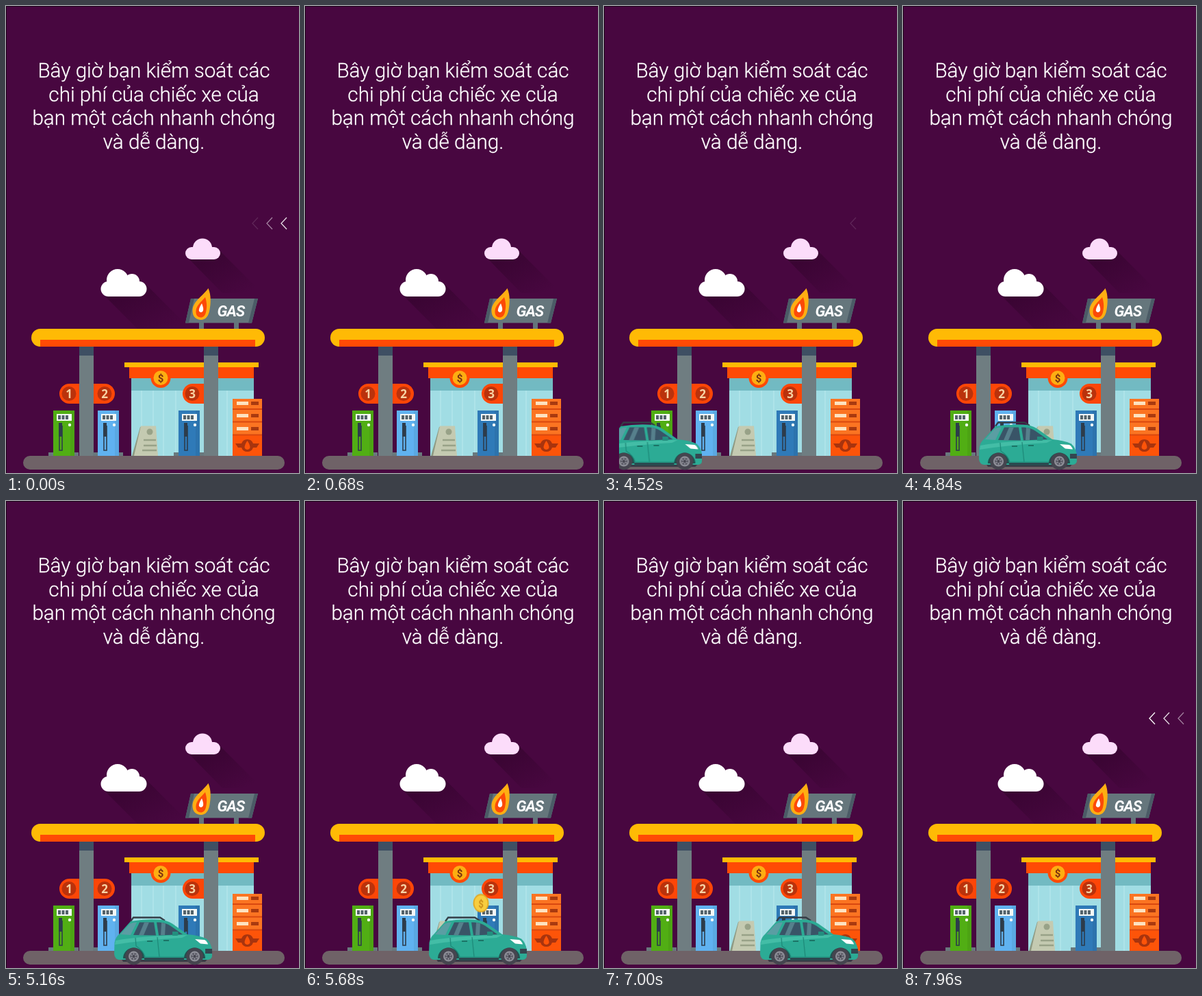
Animation, 428 px wide and 680 px high, one loop 8 s. Source, as an HTML page:

```html
<!DOCTYPE html>
<html lang="vi">
<head>
<meta charset="utf-8">
<title>Trạm xăng</title>
<style>
html, body { margin: 0; width: 100%; height: 100%; overflow: hidden; background: #480740; }
svg { display: block; width: 428px; height: 680px; }
.copy { font: 300 29.7px Roboto, sans-serif; fill: #fff; stroke: #fff; stroke-width: .3; text-anchor: middle; }
.gas { font: italic 700 22.5px Roboto, sans-serif; letter-spacing: -1.2px; fill: #fff; }
.num { font: 700 17px "Noto Sans", "Open Sans", sans-serif; fill: #f8d3a4; text-anchor: middle; }
.usd { font: 700 15px Roboto, sans-serif; text-anchor: middle; }
.chev { fill: none; stroke: #fff; stroke-width: 1.3; }

#c3, #c2, #c1, .drift, .dash, .toss { animation: 8s linear infinite; }
#c3 { animation-name: c3; }
#c2 { animation-name: c2; }
#c1 { animation-name: c1; }
@keyframes c3 {
  0% { opacity: .875 } .5%, 1.5% { opacity: 1 } 5.5%, 45% { opacity: 0 }
  49%, 50% { opacity: 1 } 54%, 92.5% { opacity: 0 } 96.5%, 97.5% { opacity: 1 } 100% { opacity: .375 }
}
@keyframes c2 {
  0% { opacity: .5 } 2%, 3% { opacity: 1 } 7%, 46.5% { opacity: 0 }
  50.5%, 51.5% { opacity: 1 } 55.5%, 94% { opacity: 0 } 98%, 99% { opacity: 1 } 100% { opacity: .75 }
}
@keyframes c1 {
  0% { opacity: .125 } 3.5%, 4.5% { opacity: 1 } 8.5%, 48% { opacity: 0 }
  52%, 53% { opacity: 1 } 57%, 95.5% { opacity: 0 } 99.5%, 100% { opacity: 1 }
}

/* slow drift plus a cubic dash in and out */
.drift { animation-name: drift; }
@keyframes drift {
  0%, 50% { transform: translateX(121.4px) }
  100% { transform: translateX(260.9px) }
}
.dash { animation-name: dash; }
@keyframes dash {
  0%, 50% { transform: translateX(-521px); animation-timing-function: cubic-bezier(.3333, 1, .6667, 1) }
  68.375% { transform: none }
  85.25% { transform: none; animation-timing-function: cubic-bezier(.3333, 0, .6667, 0) }
  100% { transform: translateX(269.5px) }
}
.toss { animation-name: toss; }
@keyframes toss {
  0%, 69.99% { transform: translate(77px, 618px); opacity: 0 }
  70% { transform: translate(77px, 618px); opacity: 1; animation-timing-function: cubic-bezier(.333, .667, .667, 1) }
  76.25% { transform: translate(77px, 509px); opacity: 1; animation-timing-function: cubic-bezier(.333, 0, .667, .333) }
  82.5% { transform: translate(77px, 618px); opacity: 1 }
  82.51%, 100% { transform: translate(77px, 618px); opacity: 0 }
}
.spin { animation: spin .2s -.38s ease-in-out infinite alternate; }
@keyframes spin { from { transform: scaleX(1) } to { transform: scaleX(.2) } }
</style>
</head>
<body>
<svg viewBox="0 0 428 680">
  <defs>
    <linearGradient id="shade" x1="0" y1="0" x2="1" y2="1">
      <stop offset=".25" stop-color="#36042f" stop-opacity=".75"/>
      <stop offset=".9" stop-color="#36042f" stop-opacity="0"/>
    </linearGradient>
    <clipPath id="road"><rect x="22" y="480" width="385" height="200"/></clipPath>
    <g id="pump">
      <rect x="-7" y="61" width="44" height="6" fill="#69787d"/>
      <rect width="31" height="66"/>
      <rect x="25" width="6" height="66" fill="#000" opacity=".06"/>
      <rect x="5" y="5" width="22" height="10" fill="#f4f8f6"/>
      <path d="M7 7h4v6h-4zM12.500 7h4v6h-4zM18 7h4v6h-4z" fill="#53626a"/>
      <circle cx="24" cy="21" r="2.200" fill="#f4f8f6"/>
      <path d="M8 18h5v20h-5z" fill="#2d3c4b"/>
      <path d="M9 38v20h4V22" fill="none" stroke="#2d3c4b" stroke-width="1.600"/>
    </g>
    <g id="wheel">
      <circle r="12.500" fill="#45454f"/>
      <circle r="7.500" fill="#92939c"/>
      <circle r="5.500" fill="#5d5d68"/>
      <path d="M0-5.500V5.500M-4.800-2.800L4.800 2.800M-4.800 2.800L4.800-2.800" stroke="#92939c" stroke-width="1.300"/>
      <circle r="2" fill="#45454f"/>
    </g>
    <g id="column">
      <rect width="21" height="160" fill="#6f7d81"/>
      <rect width="21" height="13" fill="#3e4f63"/>
    </g>
    <path id="chev" class="chev" d="M8 0L0 8.500L8 17"/>
  </defs>

  <rect width="428" height="680" fill="#480740"/>
  <path d="M.5 680V.5H428" fill="none" stroke="#1c0319"/>

  <g class="copy">
    <text x="216" y="104">Bây giờ bạn kiểm soát các</text>
    <text x="216" y="138.700">chi phí của chiếc xe của</text>
    <text x="216" y="173.400">bạn một cách nhanh chóng</text>
    <text x="216" y="208.100">và dễ dàng.</text>
  </g>

  <use id="c1" href="#chev" x="360" y="308"/>
  <use id="c2" href="#chev" x="381" y="308"/>
  <use id="c3" href="#chev" x="402" y="308"/>

  <!-- clouds -->
  <path d="M142 420L203 404L269 470H192Z" fill="url(#shade)"/>
  <path d="M265 366L310 354L374 418L316 418Z" fill="url(#shade)"/>
  <g fill="#fff">
    <rect x="138.500" y="401" width="67" height="22" rx="11"/>
    <circle cx="163" cy="399" r="16"/>
    <circle cx="184" cy="401" r="11"/>
  </g>
  <g fill="#fcdcfa">
    <rect x="262" y="351" width="51" height="18" rx="9"/>
    <circle cx="287" cy="352.500" r="14"/>
  </g>

  <!-- roof sign -->
  <path d="M282 460h7v11h-7zM333 460h7v11h-7z" fill="#63747b"/>
  <path d="M270 426H368L359 461.500H262Z" fill="#65767c"/>
  <path d="M270 426H275L267 461.500H262ZM363 426H368L359 461.500H354Z" fill="#4b5b66"/>
  <text class="gas" x="308.500" y="452">GAS</text>
  <path d="M295.500 411C300 421 299 434 297.500 442C296 452 291 457 285 457C277.500 457 272.500 452 272.500 444C272.500 430 287 423 295.500 411Z" fill="#ffae12"/>
  <path d="M291 424C294 433 293.500 440 292 446C290.500 451.500 288 453.500 284.500 453.500C280 453.500 277 450 277.500 444C278 436 285 431 291 424Z" fill="#fc4a08"/>
  <path d="M286 433Q291 445.500 284.500 446Q278.500 445 286 433Z" fill="#fff"/>

  <!-- shop -->
  <rect x="183" y="542" width="179" height="114" fill="#a1dde4"/>
  <path d="M198 560v96M215 560v96M230 560v96M248 560v96M323 560v96" stroke="#b3e5ea" stroke-width="1.500"/>
  <rect x="183" y="542" width="179" height="18" fill="#72bac2"/>
  <rect x="180" y="526" width="182" height="16" fill="#ff4a05"/>
  <rect x="173" y="519" width="196" height="7" fill="#ffba05"/>
  <circle cx="226" cy="541.500" r="14.500" fill="#ff4a05"/>
  <circle cx="226" cy="541.500" r="10.500" fill="#fdae12"/>
  <text class="usd" x="226" y="547" fill="#7b3210">$</text>

  <!-- pump numbers and columns -->
  <g fill="#fd4607">
    <rect x="78" y="550" width="81" height="29" rx="14.500"/>
    <path d="M300 550H272.500a14.500 14.500 0 0 0 0 29H300Z"/>
  </g>
  <g fill="#ba320c">
    <circle cx="92" cy="564.500" r="10.500"/>
    <circle cx="144" cy="564.500" r="10.500"/>
    <circle cx="272" cy="564.500" r="10.500"/>
  </g>
  <g class="num">
    <text x="92" y="570.500">1</text>
    <text x="144" y="570.500">2</text>
    <text x="272" y="570.500">3</text>
  </g>
  <use href="#column" x="107" y="496"/>
  <use href="#column" x="289" y="496"/>
  <rect x="37" y="470" width="341" height="26" rx="13" fill="#ffba05"/>
  <rect x="50" y="486" width="314" height="10" fill="#ff4a05"/>

  <use href="#pump" x="69" y="589" fill="#51ae14"/>
  <use href="#pump" x="134" y="589" fill="#60b2f0"/>
  <use href="#pump" x="252" y="589" fill="#2f7ab8"/>

  <!-- sandwich board -->
  <path d="M196 613L184 655H190L200 612Z" fill="#8e9a83"/>
  <path d="M197 611.500H219L222 655H187Z" fill="#c4cab1"/>
  <circle cx="210" cy="620" r="4.500" fill="#98a288"/>
  <path d="M201 632H219M201 640H220M199 647H220" stroke="#98a288" stroke-width="2.500"/>

  <!-- cabinet -->
  <rect x="331" y="572" width="43" height="84" fill="#fd5409"/>
  <rect x="331" y="572" width="43" height="53" fill="#fb7422"/>
  <path d="M331 587h43M331 605.500h43M331 624.500h43" stroke="#d9480f" stroke-width="2"/>
  <g id="slots">
    <rect x="337" y="576" width="17" height="5" fill="#fde2c0"/>
    <rect x="358" y="576" width="11" height="5" fill="#a93a10"/>
  </g>
  <use href="#slots" y="18"/>
  <use href="#slots" y="37"/>
  <path d="M335 637H344A9 9 0 0 1 361 637H370L366 643H361A9 9 0 0 1 344 643H339Z" fill="#a8340e"/>
  <path d="M352.500 633Q360.500 645 352.500 646Q344.500 645 352.500 633Z" fill="#fd5409"/>

  <rect x="25" y="655" width="382" height="20" rx="10" fill="#6f6267"/>

  <!-- car and coin -->
  <g clip-path="url(#road)">
    <g class="drift">
      <g class="toss"><g class="spin">
        <circle r="13.500" fill="#e0a722"/>
        <circle r="11.500" fill="#f7cd3f"/>
        <text class="usd" y="5.500" fill="#c98a1a">$</text>
      </g></g>
      <g class="dash">
        <path d="M10 664H140L134 671H14Z" fill="#393b46"/>
        <path d="M25 612L29 606.500H68L75 611" fill="none" stroke="#343d46" stroke-width="2.300"/>
        <path d="M25 612Q45 608.500 66 609.500Q77 610 86 615.500L108 631Q126 632.500 136 637.500Q142 643 144 653V663Q143 668 137 668H8Q2 667 1 660L1.500 643Q3 635 8 631Z" fill="#2cab95"/>
        <path d="M3 640Q40 633 108 632L100 636Q45 639 2 646Z" fill="#43bda6"/>
        <path d="M10 631L24 615.500Q28 613.500 34 613.500L25 632Z" fill="#5a9ea3"/>
        <path d="M29 632L38 613.500H59L62 632.500Z" fill="#395467"/>
        <path d="M63 613.500H67Q76 614 83 618.500L101 631L66 632.500Z" fill="#395467"/>
        <path d="M45 613.500H52L44 632.300H37ZM70 613.800L76 615.500L75 632H69Z" fill="#56808c"/>
        <path d="M32 636L33 648Q44 655 46 664H103M64 635L67 664" fill="none" stroke="#1e8878" stroke-width="1.200"/>
        <path d="M49 641h8M73 640h8" stroke="#1b7466" stroke-width="2"/>
        <path d="M86 627h8q2 5-1 6h-7z" fill="#238f7f"/>
        <path d="M119 638L133 639Q137 641.500 138 645.500L127 644.500Z" fill="#fff"/>
        <path d="M134 652h10v7h-10z" fill="#344650"/>
        <path d="M14 666a15.500 15.500 0 0 1 31 0zM103 666a15.500 15.500 0 0 1 31 0z" fill="#22504f"/>
        <path d="M45 665H103V669H45Z" fill="#2b4a50"/>
        <use href="#wheel" x="29.500" y="663"/>
        <use href="#wheel" x="118.500" y="663"/>
      </g>
    </g>
  </g>
</svg>
</body>
</html>
```
